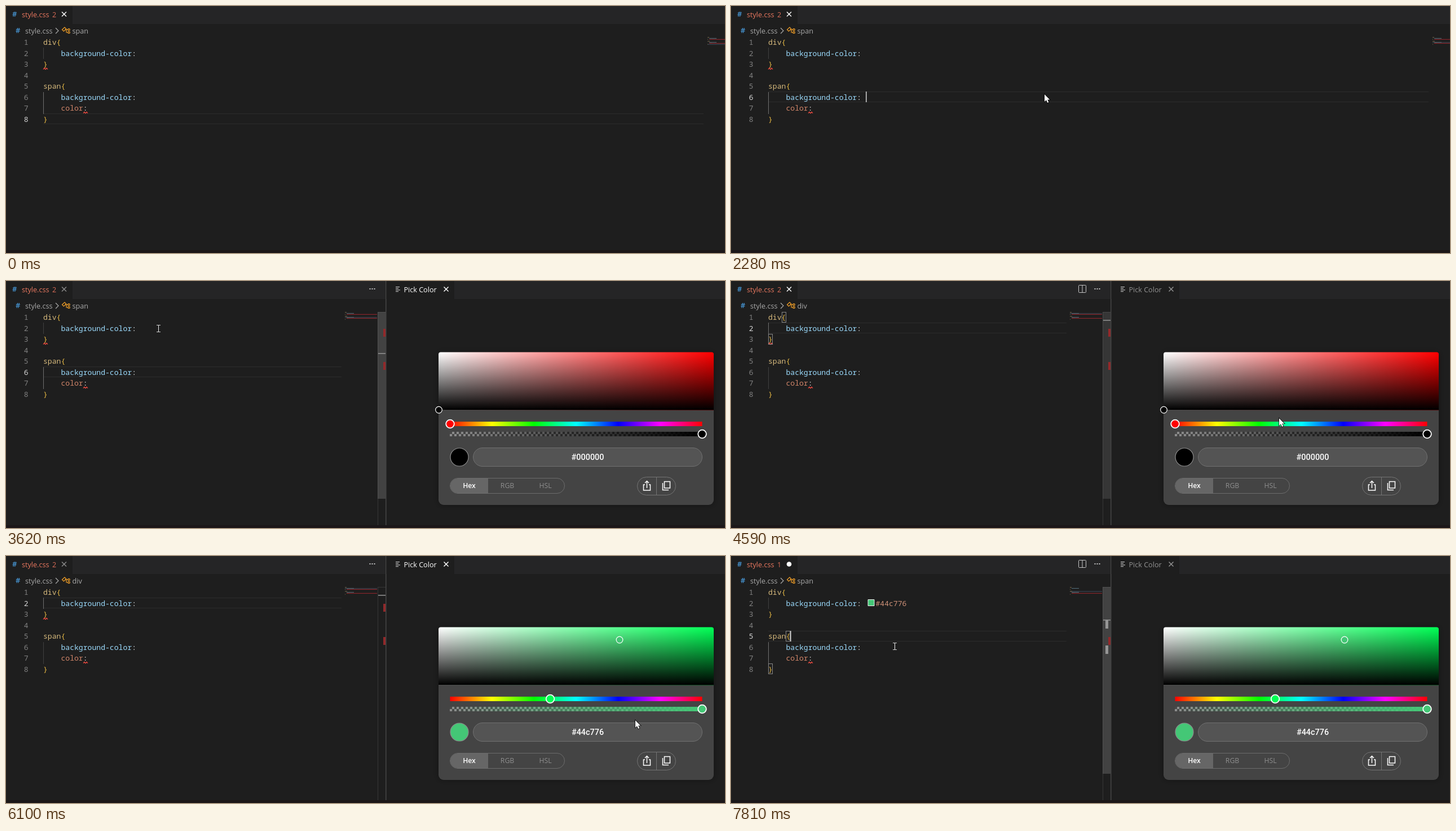
An HTML page with a canvas for the animation above (8 s loop, 1275 by 439 pixels).

```html
<!DOCTYPE html>
<html lang="en">
<head>
<meta charset="utf-8">
<title>Pick Color</title>
<style>
html, body { margin: 0; width: 100%; height: 100%; overflow: hidden; background: #1e1e1e; }
canvas { display: block; }
</style>
</head>
<body>
<canvas id="stage" width="1275" height="439"></canvas>
<script>
const ctx = document.getElementById('stage').getContext('2d');
const LOOP = 8000, CHAR = 7.86, LINE = 19.57, LEFT = 66;
const UI = '12.6px "Open Sans", "Noto Sans", sans-serif';
const MONO = '13.1px "Noto Sans Mono", monospace';
const PICKED = '#44c776';
const SELECTOR = '#d7ba7d', BRACE = '#e6b844', PROP = '#9cdcfe', PLAIN = '#d4d4d4', VALUE = '#ce9178';

// Pointer hotspot: time, x, y
const path = [
  [170, 600, 421], [420, 572, 250], [680, 556, 157], [3130, 556, 157], [3340, 430, 118],
  [3620, 270, 84], [3890, 270, 84], [4200, 600, 138], [4450, 985, 226], [4590, 972, 244],
  [4730, 965, 253], [4940, 965, 253], [5410, 994, 198], [5550, 1088, 149], [5690, 1088, 149],
  [6020, 1110, 270], [6380, 1136, 367], [6580, 1136, 367], [6820, 803, 303], [7120, 483, 260],
  [7260, 388, 237], [7400, 315, 168], [7530, 292, 145], [7670, 290, 147], [7810, 290, 160]
];

function rect(x, y, w, h, color) {
  ctx.fillStyle = color;
  ctx.fillRect(x, y, w, h);
}

function text(str, x, y, color, font = UI, align = 'left') {
  ctx.font = font;
  ctx.textAlign = align;
  ctx.fillStyle = color;
  ctx.fillText(str, x, y);
}

function stroke(points, color, width = 1) {
  ctx.beginPath();
  points.forEach(([x, y]) => ctx.lineTo(x, y));
  ctx.strokeStyle = color;
  ctx.lineWidth = width;
  ctx.stroke();
}

function circle(x, y, r, fill, border, width = 1) {
  ctx.beginPath();
  ctx.arc(x, y, r, 0, Math.PI * 2);
  if (fill) { ctx.fillStyle = fill; ctx.fill(); }
  if (border) { ctx.strokeStyle = border; ctx.lineWidth = width; ctx.stroke(); }
}

function box(x, y, w, h, r, fill, border) {
  ctx.beginPath();
  ctx.roundRect(x, y, w, h, r);
  if (fill) { ctx.fillStyle = fill; ctx.fill(); }
  if (border) { ctx.strokeStyle = border; ctx.lineWidth = 1; ctx.stroke(); }
}

function gradient(x0, y0, x1, y1, colors) {
  const g = ctx.createLinearGradient(x0, y0, x1, y1);
  colors.forEach((c, i) => g.addColorStop(i / (colors.length - 1), c));
  return g;
}

function cross(x, y, color) {
  stroke([[x - 4, y - 4], [x + 4, y + 4]], color, 1.4);
  stroke([[x - 4, y + 4], [x + 4, y - 4]], color, 1.4);
}

function squiggle(x, y) {
  stroke([0, 1, 2, 3, 4].map(i => [x + i * 2, y + (i % 2 ? -1.2 : 1.2)]), '#e5483f', 1.2);
}

const lineTop = n => 54.5 + LINE * (n - 1);
const baseline = n => 69 + LINE * (n - 1);
const column = n => LEFT + n * CHAR;

function stateAt(t) {
  const editorFocus = t < 1820 || (t >= 2280 && t < 2350) || (t >= 3820 && t < 4800) || t >= 7600;
  const clickTime = t < 3820 ? 750 : t < 7600 ? 3820 : 7600;
  const blinkOn = t < 1820 ? Math.floor((t - clickTime) / 490) % 2 === 0
    : t < 2350 || Math.floor((t - clickTime) / 500) % 2 === 0;
  return {
    t, editorFocus,
    line: t < 750 ? 8 : t < 3820 ? 6 : t < 7600 ? 2 : 5,
    caret: t >= 750 && editorFocus && blinkOn,
    menu: t >= 1820 && t < 2280,
    split: t >= 2350,
    picker: t >= 2480,
    green: t >= 4800,
    chosen: t >= 5550,
    inserted: t >= 6540,
    decorated: t >= 7600
  };
}

function drawTabs(s) {
  rect(0, 0, 1275, 32, '#252526');
  rect(0, 0, 118, 32, '#1e1e1e');
  const mark = s.editorFocus ? '#ffffff' : '#8c8c8c';
  text('#', 11, 19, '#4a9ee0', '600 13px "Open Sans", sans-serif');
  text('style.css', 28, 19.5, '#ea7860');
  text(s.inserted ? '1' : '2', 82, 19.5, '#d96c57');
  if (s.inserted) circle(103, 14.5, 4.3, mark);
  else cross(103, 14.5, mark);

  const symbol = s.line === 2 ? 'div' : 'span';
  text('#', 17, 48, '#4a9ee0', '600 13px "Open Sans", sans-serif');
  text('style.css', 34, 48.5, '#a9a9a9');
  stroke([[88, 39], [93, 44], [88, 49]], '#a9a9a9', 1.2);
  ctx.save();
  ctx.translate(103.5, 41);
  ctx.rotate(-0.75);
  ctx.strokeStyle = '#ee9d28';
  ctx.lineWidth = 1.3;
  ctx.strokeRect(-3.5, -2, 6, 4);
  ctx.restore();
  stroke([[105, 42], [110, 42]], '#ee9d28', 1.2);
  stroke([[107, 42], [107, 47], [110, 47]], '#ee9d28', 1.2);
  circle(111.5, 42, 1.7, '#1e1e1e', '#ee9d28', 1.3);
  circle(111.5, 47, 1.7, '#1e1e1e', '#ee9d28', 1.3);
  text(symbol, 117.5, 48.5, '#a9a9a9');
}

function drawCode(s) {
  const lineRight = s.split ? 595 : 1237;
  rect(LEFT, Math.round(lineTop(s.line)), lineRight - LEFT, 1, '#2c2c2c');
  rect(LEFT, Math.round(lineTop(s.line)) + 18, lineRight - LEFT, 1, '#2c2c2c');
  rect(LEFT, 74, 1, 20, s.line === 2 ? '#707070' : '#404040');
  rect(LEFT, 153, 1, 39, s.line === 2 ? '#404040' : '#707070');

  if (s.inserted && !s.decorated) box(column(22), 75, 7 * CHAR + 1, 19, 3, '#3d4044');
  const background = [['    background-color', PROP], [':', PLAIN]];
  const rows = [
    [['div', SELECTOR], ['{', BRACE]], background, [['}', BRACE]], [],
    [['span', SELECTOR], ['{', BRACE]], background,
    [['    color', '#cf8468'], [':', PLAIN]], [['}', BRACE]]
  ];
  rows.forEach((tokens, i) => {
    const n = i + 1;
    text(n, 39.5, baseline(n), n === s.line ? '#d6d6d6' : '#808080', MONO, 'right');
    let col = 0;
    for (const [str, color] of tokens) {
      text(str, column(col), baseline(n), color, MONO);
      col += str.length;
    }
  });
  if (s.inserted) {
    text(PICKED, column(22) + (s.decorated ? 17.5 : 0.5), baseline(2), VALUE, MONO);
    if (s.decorated) box(243, 77.5, 11, 11, 0, PICKED, '#eeeeee');
  } else squiggle(66, 111.5);
  squiggle(137, 189.5);

  if (s.editorFocus && (s.line === 2 || s.line === 5)) {
    const pair = s.line === 2 ? [[3, 1], [0, 3]] : [[4, 5], [0, 8]];
    for (const [col, n] of pair) {
      ctx.strokeStyle = '#888888';
      ctx.lineWidth = 1;
      ctx.strokeRect(Math.round(column(col)) + 0.5, Math.round(lineTop(n)) + 0.5, 7, 18);
    }
  }
  if (s.caret) rect(s.line === 5 ? 105 : 239, Math.round(lineTop(s.line)), 1.6, 19, '#c8c8c8');
}

function drawMinimap(s) {
  const x = s.split ? 601 : 1244, right = s.split ? 658 : 1275;
  const row = n => 55.3 + 1.75 * (n - 1);
  rect(x, row(s.line), right - x, 1.4, '#343e4b');
  [[0, 3], [3, 16], [0, 1], [0, 0], [0, 4], [3, 16], [3, 8], [0, 1]].forEach(([a, b], i) => {
    rect(x + a, row(i + 1), b - a, 1, b > 10 ? '#57727f' : '#7b6b4d');
  });
  if (!s.inserted) rect(x + 3, row(3), right - x - 3, 1.2, '#87252b');
  rect(x + 3, row(7), right - x - 3, 1.2, '#87252b');
}

function drawScrollbar(s) {
  rect(659, 55, 1, 380, '#363636');
  rect(659, 55, 14, 1, '#363636');
  const visible = s.t < 4400 ? 1 : s.t < 4950 ? (4950 - s.t) / 550 : s.t < 7190 ? 0 : Math.min(1, (s.t - 7190) / 100);
  rect(659, 55, 14, 332, `rgba(121,121,121,${0.4 * visible})`);
  if (!s.inserted) rect(669, 85, 4, 14, '#92292b');
  rect(669, 144, 4, 14, '#92292b');
  if (s.line === 5) {
    rect(664, 114, 5, 15, '#959595');
    rect(664, 159, 5, 15, '#959595');
  }
  const y = { 6: 128, 2: 69, 5: 113 }[s.line];
  rect(660, y, 13, 1.6, '#8f8f8f');
}

function drawSplit(s) {
  rect(673, 0, 1.5, 435, '#444444');
  rect(674.5, 0, 120.5, 32, '#1e1e1e');
  [646, 650, 654].forEach(x => rect(x - 1.5, 13, 2, 2, '#c5c5c5'));
  if (s.editorFocus) {
    box(616.5, 7.5, 13, 13, 1, null, '#c5c5c5');
    rect(622.5, 8, 1, 12, '#c5c5c5');
  }
  const color = s.editorFocus ? '#929292' : '#ffffff';
  [7, 5, 8, 5].forEach((w, i) => rect(691, 10 + i * 2.7, w, 1.1, '#c5c5c5'));
  text('Pick Color', 705.5, 19.5, color);
  cross(780.5, 14.5, color);
}

function drawPicker(s) {
  const color = s.chosen ? PICKED : '#000000';
  const hue = s.green ? '#00ff55' : '#ff0000';
  const clear = s.chosen ? 'rgba(68,199,118,0)' : 'rgba(0,0,0,0)';
  ctx.save();
  ctx.shadowColor = 'rgba(0,0,0,.35)';
  ctx.shadowBlur = 12;
  box(767, 127, 488, 271, [4, 4, 9, 9], '#444444');
  ctx.restore();
  box(767, 126.5, 488, 103, [4, 4, 0, 0], gradient(767, 0, 1255, 0, ['#ffffff', hue]));
  box(767, 126.5, 488, 103, [4, 4, 0, 0], gradient(0, 127, 0, 229, ['rgba(0,0,0,0)', '#000000']));
  if (s.chosen) circle(1088, 149, 5.8, PICKED, '#ffffff', 1.2);
  else circle(767.5, 229, 5.8, '#000000', '#ffffff', 1.2);

  rect(787.5, 250, 447, 8,
    gradient(787, 0, 1235, 0, ['#ff0000', '#ffff00', '#00ff00', '#00ffff', '#0000ff', '#ff00ff', '#ff0000']));
  circle(s.green ? 965 : 787.5, 254, 7.3, hue, '#ffffff', 1.8);

  for (let i = 0; i < 112; i++) {
    for (let j = 0; j < 2; j++) {
      rect(787 + i * 4, 268 + j * 4, 4, 4, (i + j) % 2 ? '#8c8c8c' : '#484848');
    }
  }
  rect(787, 268, 448, 8, gradient(787, 0, 1235, 0, [clear, color]));
  circle(1234.5, 272, 7.3, color, '#ffffff', 1.8);

  circle(804, 313, 16, color, '#8c8c8c', 1.2);
  box(828.5, 296.5, 406, 33, 16.5, '#545454', '#707070');
  text(color, 1031.5, 318.2, '#ffffff', '500 14.4px Roboto, sans-serif', 'center');

  box(787.5, 350.5, 203, 27, 13.5, null, '#6c6c6c');
  box(788, 351, 67, 26, [13, 0, 0, 13], '#666666');
  const small = '12.2px "Open Sans", sans-serif';
  text('Hex', 821.5, 368.3, '#ffffff', '600 ' + small, 'center');
  text('RGB', 889, 368.3, '#8e8e8e', small, 'center');
  text('HSL', 956.5, 368.3, '#8e8e8e', small, 'center');

  box(1119.5, 348.5, 68, 32, 16, null, '#747474');
  rect(1153, 349, 1, 31, '#747474');
  stroke([[1133, 362], [1130.5, 362], [1130.5, 372], [1142.5, 372], [1142.5, 362], [1140, 362]], '#ffffff', 1.5);
  stroke([[1136.5, 368], [1136.5, 356]], '#ffffff', 1.5);
  stroke([[1133, 359], [1136.5, 355.5], [1140, 359]], '#ffffff', 1.5);
  ctx.lineWidth = 1.5;
  ctx.strokeRect(1167.5, 356.5, 10, 11.5);
  stroke([[1164.5, 359], [1164.5, 371.5], [1175, 371.5]], '#ffffff', 1.5);
}

function drawMenu() {
  ctx.save();
  ctx.shadowColor = '#000000';
  ctx.shadowBlur = 8;
  ctx.shadowOffsetY = 2;
  rect(556, 157, 304, 185, '#303031');
  ctx.restore();
  let y = 180;
  for (const [label, keys] of [['Pick Color'], null, ['Change All Occurrences', 'Ctrl+F2'], null,
    ['Cut', 'Ctrl+X'], ['Copy', 'Ctrl+C'], ['Paste', 'Ctrl+V'], null,
    ['Command Palette...', 'Ctrl+Shift+P']].map(item => item || [])) {
    if (label) {
      text(label, 582, y, '#cccccc');
      if (keys) text(keys, 834, y, '#cccccc', UI, 'right');
      y += 24;
    } else {
      rect(566, y - 12, 284, 1, '#505050');
      y += 9;
    }
  }
}

const shapes = {
  arrow: 'M0 0V13L3 10.2L5.2 15L7.4 14L5.3 9.4H9.3Z',
  hand: 'M-1.5 1.2Q0-.8 1.5 1.2V6L6 7Q8 7.6 8 9.5L7 14L5.5 17.5H-1.5L-5.5 11.5Q-5.6 9.3-3.6 10L-1.5 11.8Z'
};

function pointerKind(x, y, t) {
  const inside = (l, top, r, bottom) => x >= l && x <= r && y >= top && y <= bottom;
  if (t >= 1820 && t < 2350) return 'arrow';
  if (x < 659 || inside(787, 297, 1235, 330)) return 'beam';
  return inside(767, 127, 1255, 229) || inside(787, 249, 1235, 277) || inside(1120, 348, 1188, 381)
    ? 'hand' : 'arrow';
}

function drawPointer(t) {
  if (t < path[0][0]) return;
  let i = path.findIndex(p => p[0] > t);
  const b = path[i < 0 ? path.length - 1 : i], a = i < 0 ? b : path[i - 1];
  const k = a === b ? 0 : (t - a[0]) / (b[0] - a[0]);
  const x = a[1] + (b[1] - a[1]) * k, y = a[2] + (b[2] - a[2]) * k;
  const kind = pointerKind(x, y, t);
  ctx.save();
  ctx.translate(Math.round(x), Math.round(y));
  if (kind === 'beam') {
    rect(0, -6, 1, 13, '#f0f0f0');
    [-6, 6].forEach(dy => rect(-3, dy, 7, 1, '#d0d0d0'));
  } else {
    const shape = new Path2D(shapes[kind]);
    ctx.strokeStyle = '#000000';
    ctx.lineWidth = 1.4;
    ctx.stroke(shape);
    ctx.fillStyle = '#ffffff';
    ctx.fill(shape);
  }
  ctx.restore();
}

function draw(t) {
  const s = stateAt(t);
  rect(0, 0, 1275, 439, '#1e1e1e');
  drawTabs(s);
  drawCode(s);
  drawMinimap(s);
  if (s.split) {
    drawScrollbar(s);
    drawSplit(s);
  }
  if (s.picker) drawPicker(s);
  if (s.menu) drawMenu();
  rect(0, 434, 1275, 5, '#1b1618');
  drawPointer(t);
}

const start = performance.now();
function tick() {
  draw((performance.now() - start) % LOOP);
  requestAnimationFrame(tick);
}
tick();
</script>
</body>
</html>
```
